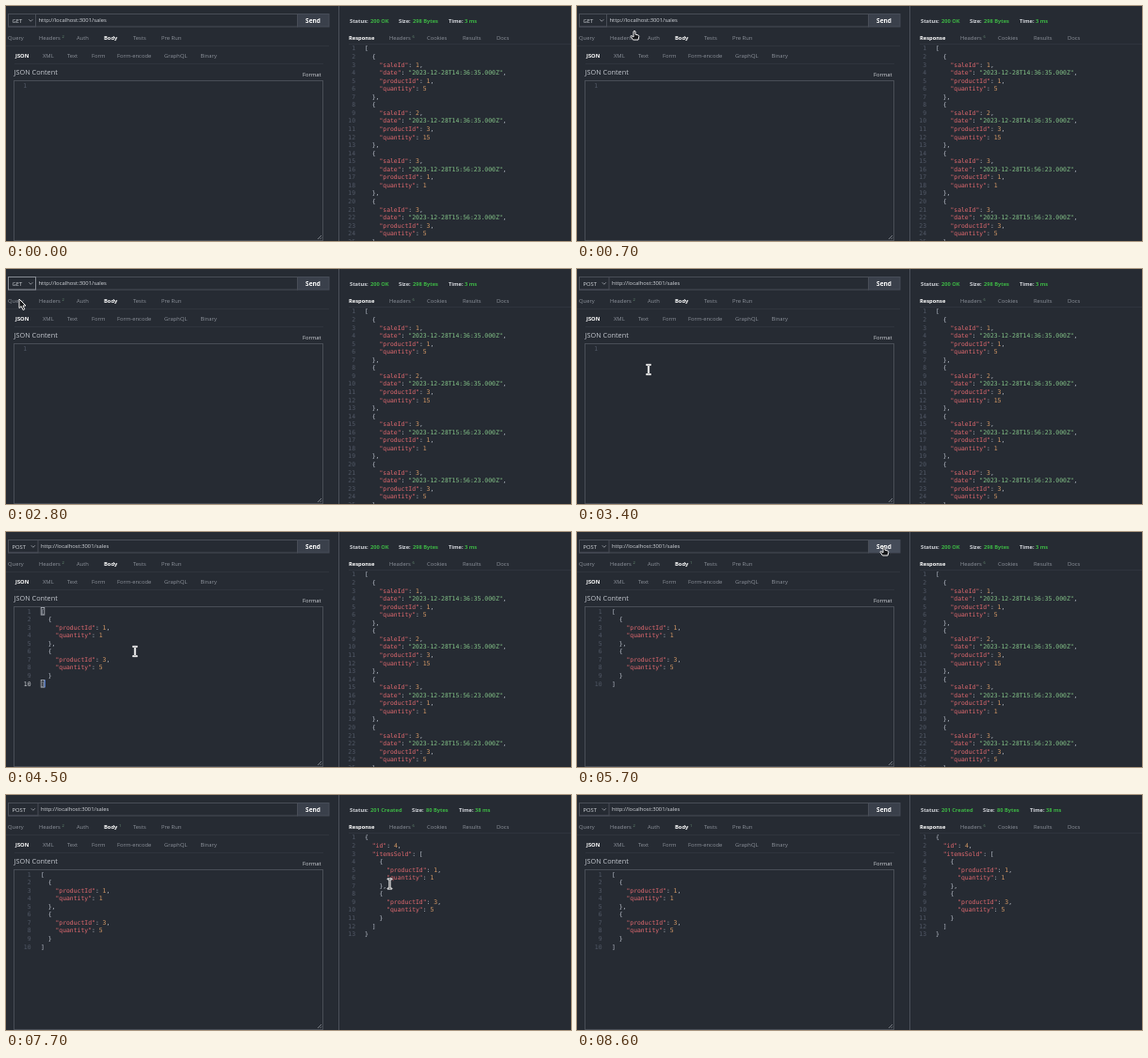
An HTML page that plays this animation: 600 px wide and 250 px high, repeating every 9.2 s.

```html
<!DOCTYPE html>
<html lang="en">
<head>
<meta charset="utf-8">
<style>
  html, body { margin: 0; width: 100%; height: 100%; overflow: hidden; background: #262b33; }
  svg { display: block; }
  text { white-space: pre; font: 5.85px "Open Sans", "Noto Sans", sans-serif; fill: #8d929b; }
  .on { fill: #fff; font-weight: 700; font-size: 5.75px; }
  .lit { fill: #d3d6db; }
  .ok { fill: #3db545; font-weight: 700; font-size: 5.7px; }
  .label { fill: #d3d6db; font-weight: 700; font-size: 5.7px; }
  .sup { font-size: 4px; fill: #6b9377; }
  .title { font-size: 7.3px; fill: #c3c7ce; }
  .code { font: 6.42px "DejaVu Sans Mono", monospace; fill: #b9bfca; }
  .num { fill: #525967; text-anchor: end; }
  .key { fill: #e0696f; } .str { fill: #84c488; } .val { fill: #d69a66; }
  .line { fill: none; stroke: #484d56; }
  .cur { fill: #15171a; stroke: #f2f2f2; stroke-width: 1; stroke-linejoin: round; }
</style>
</head>
<body>
<svg id="stage" width="600" height="250" viewBox="0 0 600 250"></svg>
<script>
const LOOP = 9200, ROW = 7.65, LINE = 8.56;
const stage = document.getElementById('stage');

function add(tag, attrs, parent = stage, content = '') {
  const el = document.createElementNS('http://www.w3.org/2000/svg', tag);
  for (const k in attrs) el.setAttribute(k, attrs[k]);
  el.innerHTML = content;
  return parent.appendChild(el);
}
const group = () => add('g', {});
const text = (x, y, s, cls = '', parent = stage) => add('text', { x, y, class: cls }, parent, s);
const rect = (x, y, width, height, attrs, parent = stage) =>
  add('rect', { x, y, width, height, ...attrs }, parent);
const show = (el, on) => el.style.display = on ? '' : 'none';

// Syntax-coloured JSON with line numbers ending at numX
function code(lines, x, numX, y, parent) {
  return lines.map((s, i) => {
    const base = y + i * LINE;
    const html = s.replace(/("[^"]*")(:?)|\b\d+\b/g, (m, q, colon) =>
      `<tspan class="${q ? (colon ? 'key' : 'str') : 'val'}">${q || m}</tspan>${colon || ''}`);
    text(x, base, html, 'code', parent);
    return text(numX, base, i + 1, 'code num', parent);
  });
}
const json = data => JSON.stringify(data, null, 2).split('\n');

// Request bar; the method box grows with its text and pushes the address
rect(309.5, 8.5, 33.5, 13.5, { fill: '#3a404b', stroke: '#474d58' });
const hover = rect(309.5, 8.5, 33.5, 13.5, { fill: '#454c59' });
rect(2.5, 8.5, 307, 13.5, { class: 'line' });
const select = rect(2.5, 8.5, 29, 13.5, { class: 'line' });
const method = text(6.5, 17.5, 'GET', 'lit');
const pushed = group();
add('path', { d: 'M24.3 14.3l2 2 2-2', fill: 'none', stroke: '#a5a9b0', 'stroke-width': .8 }, pushed);
text(34.5, 17.2, 'http://localhost:3001/sales', 'lit', pushed);
add('text', { x: 326, y: 17.6, class: 'on', style: 'font-size:6.5px;text-anchor:middle' }, stage, 'Send');

// Tabs
const tabs = (y, active, list) =>
  list.forEach(([x, s]) => text(x, y, s, s === active ? 'on' : ''));
tabs(36, 'Body', [[2, 'Query'], [35, 'Headers'], [75, 'Auth'], [104, 'Body'], [135, 'Tests'], [165, 'Pre Run']]);
tabs(55.3, 'JSON', [[10, 'JSON'], [39, 'XML'], [65, 'Text'], [91, 'Form'], [118, 'Form-encode'], [168, 'GraphQL'], [206.5, 'Binary']]);
tabs(36, 'Response', [[364, 'Response'], [407, 'Headers'], [447, 'Cookies'], [485, 'Results'], [521, 'Docs']]);
text(59.5, 33.5, '2', 'sup');
text(431.5, 33.5, '6', 'sup');
const bodyCount = text(120, 33.5, '1', 'sup');
const rule = (x1, x2, y) => add('path', { d: `M${x1} ${y}H${x2}`, stroke: '#2f343d' });
rule(0, 343, 42.5);
rule(9, 337, 61.5);
rule(364, 600, 40.5);
add('path', { d: 'M353.5 0V250', stroke: '#4b5059' });

// Body editor
text(8.5, 73.2, 'JSON Content', 'title');
text(315, 75, 'Format', 'lit');
rect(8.5, 79.5, 328, 170, { class: 'line' });
add('path', { d: 'M331 248l4-4M333.5 248l1.5-1.5', stroke: '#9a9ea5', 'stroke-width': .7 });
const emptyNum = text(22, 86.5, '1', 'code num');
const items = [{ productId: 1, quantity: 1 }, { productId: 3, quantity: 5 }];
const pasted = group();
const lastNum = code(json(items), 37, 26.5, 86.5, pasted)[9];
const focus = add('g', {}, pasted);
for (const i of [0, 9])
  rect(37.2, 80.5 + i * LINE, 3.6, 7.6, { fill: 'none', stroke: '#b4b8c0', 'stroke-width': .8 }, focus);
rect(40.8, 157.3, .8, 8, { fill: '#528bff' }, focus);

// Responses
function response(status, size, time, xs, data) {
  const g = group();
  ['Status:', status, 'Size:', size, 'Time:', time].forEach((s, i) =>
    text(xs[i], 17.7, s, i % 2 ? 'ok' : 'label', g));
  code(json(data), 381, 371, 47.4, g);
  return g;
}
const sale = (saleId, time, productId, quantity) =>
  ({ saleId, date: `2023-12-28T${time}.000Z`, productId, quantity });
const listed = response('200 OK', '298 Bytes', '3 ms', [365, 387, 417, 432, 470, 487], [
  sale(1, '14:36:35', 1, 5), sale(2, '14:36:35', 3, 15),
  sale(3, '15:56:23', 1, 1), sale(3, '15:56:23', 3, 5)]);
const created = response('201 Created', '80 Bytes', '38 ms', [365, 387, 431, 446, 481, 498],
  { id: 4, itemsSold: items });

// Method list
const menu = group();
rect(2.5, 22.5, 33.5, 70.5, { fill: '#252a33', stroke: '#a9adb4', 'stroke-width': .8 }, menu);
const mark = rect(3, 23, 32.5, ROW, { fill: '#1e90ff' }, menu);
['GET', 'POST', 'PUT', 'DELETE', 'PATCH', 'HEAD', 'OPTIONS', 'PROPFIND', 'CUSTOM'].forEach((s, i) =>
  text(6.5, 28.6 + i * ROW, s, 'lit', menu));

// Pointer shapes
const cursor = {
  arrow: 'M0 0V9.6L2.2 7.6 4.1 11.6 5.8 10.8 4 7H7Z',
  hand: 'M-1 0Q0-1 1 0V3.2L4 4Q5 4.3 4.8 5.5L4 9H-1.5L-4 5.5Q-4 4.3-3 4.7L-1 6Z',
  beam: 'M-2.4-5.6H2.4V-4.6H.6V4.6H2.4V5.6H-2.4V4.6H-.6V-4.6H-2.4Z'
};
const pointer = add('path', { class: 'cur' });

// time, x, y, shape
const path = [
  [300, 190, 120, 'beam'], [500, 110, 62, 'beam'], [600, 80, 42, 'hand'], [700, 61, 27, 'hand'],
  [900, 27, 15, 'hand'], [1300, 27, 15, 'arrow'], [1800, 27.5, 29, 'arrow'], [2000, 27.5, 29, 'arrow'],
  [2200, 27.5, 31, 'arrow'], [2400, 27.5, 31, 'arrow'], [2500, 21, 42, 'arrow'], [2600, 14, 32, 'arrow'],
  [3000, 14, 32, 'arrow'], [3300, 58, 85, 'arrow'], [3400, 76, 107, 'beam'], [3900, 76, 107, 'beam'],
  [4500, 137, 127, 'beam'], [4900, 281, 74, 'beam'], [5200, 315, 34, 'arrow'], [5400, 326, 16, 'hand'],
  [6600, 326, 16, 'hand'], [6700, 348, 30, 'arrow'], [7000, 390, 46, 'arrow'], [7100, 402, 51, 'beam'],
  [7200, 402, 51, 'beam'], [8200, 413, 138, 'beam'], [8500, 535, 53, 'beam'], [8600, 535, 53, '']
];

function locate(t) {
  let i = path.length - 1;
  while (i >= 0 && path[i][0] > t) i--;
  if (i < 0) return [0, 0, ''];
  const a = path[i], b = path[i + 1] || a;
  const k = b === a ? 0 : (t - a[0]) / (b[0] - a[0]);
  return [a[1] + (b[1] - a[1]) * k, a[2] + (b[2] - a[2]) * k, a[3]];
}

function draw(now) {
  const t = Math.floor(now % LOOP / 100) * 100;
  const within = (a, b) => t >= a && t < b;
  const [x, y, shape] = locate(t);
  show(pointer, shape);
  if (shape) {
    pointer.setAttribute('d', cursor[shape]);
    pointer.setAttribute('transform', `translate(${x} ${y})`);
  }
  show(menu, within(1200, 2800));
  mark.setAttribute('y', 23 + Math.max(0, Math.floor((y - 23) / ROW)) * ROW);
  const post = t >= 2900;
  method.textContent = post ? 'POST' : 'GET';
  select.setAttribute('width', post ? 31.5 : 29);
  pushed.setAttribute('transform', `translate(${post ? 2.5 : 0} 0)`);
  select.style.stroke = within(2800, 2900) ? '#858a92' : '';
  show(emptyNum, t < 4000);
  show(pasted, t >= 4000);
  show(focus, t < 5700);
  lastNum.style.fill = t < 5700 ? '#d3d6db' : '';
  show(bodyCount, t >= 5400);
  show(hover, within(5400, 6700));
  show(listed, t < 5900);
  show(created, t >= 5900);
}

const start = performance.now();
function tick() {
  draw(performance.now() - start);
  requestAnimationFrame(tick);
}
tick();
</script>
</body>
</html>
```
